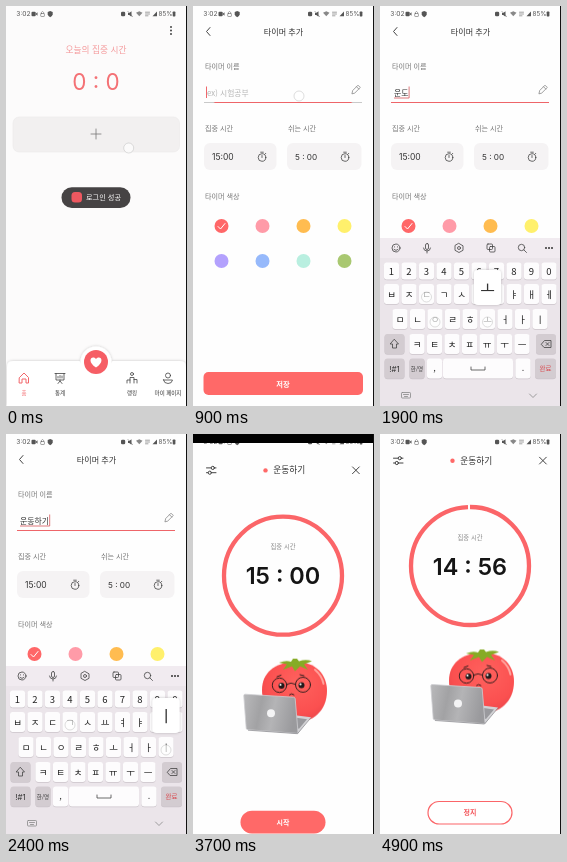
An HTML page that plays this animation: 181x400 px, repeating every 5 s.

```html
<!DOCTYPE html>
<html lang="ko">
<head>
<meta charset="utf-8">
<title>타이머</title>
<style>
html, body { margin: 0; width: 100%; height: 100%; overflow: hidden; background: #fff; }
svg { display: block; }
text { font-family: "Noto Sans CJK KR", "Noto Sans CJK", sans-serif; fill: #333; }
.num { font-family: Inter, sans-serif; }
.mid { text-anchor: middle; }
.label { font-size: 7.1px; fill: #777; }
.line { fill: none; stroke: #444; stroke-width: 1; stroke-linecap: round; stroke-linejoin: round; }
.thin { stroke-width: .8; }
.red { fill: #ff6968; }
.touch { fill: #fff; fill-opacity: .65; stroke: #bbb; stroke-opacity: .7; stroke-width: .7; }
.key { fill: #fdfcfd; }
.fn { fill: #d3ccd1; }
.cap { font-size: 9.5px; fill: #222; text-anchor: middle; }
.en text { font-family: Roboto, sans-serif; font-size: 10.5px; }
#clock text { fill: #151515; }
#status text { fill: #555; }

#add { animation: add 5s linear infinite; }
@keyframes add { 0%, 11.99% { opacity: 0 } 12% { opacity: .25 } 15%, 100% { opacity: 1 } }
#focus { transform-origin: 90px 96px; animation: focus 5s linear infinite; }
@keyframes focus { 0%, 16% { transform: scaleX(0) } 18%, 19.9% { transform: scaleX(.87) } 21%, 100% { transform: none } }
#keyboard { animation: keyboard 5s ease-out infinite; }
@keyframes keyboard {
  0%, 19.99% { transform: translateY(170px) }
  20% { transform: translateY(100px) }
  22%, 49.99% { transform: none }
  50% { transform: translateY(30px) }
  54%, 100% { transform: translateY(170px) }
}
#timer { animation: timer 5s linear infinite; }
@keyframes timer { 0%, 57.99% { opacity: 0 } 58% { opacity: .4 } 60%, 100% { opacity: 1 } }
#shift { animation: shift 5s ease-out infinite; }
@keyframes shift { 0%, 73.99% { transform: none } 74%, 75.99% { transform: translateY(9.7px) } 80%, 100% { transform: none } }
#cover { animation: cover 5s ease-out infinite; }
@keyframes cover { 0%, 73.99% { transform: translateY(-10px) } 74%, 75.99% { transform: none } 80%, 100% { transform: translateY(-10px) } }
#ring { stroke-dasharray: 900 900; animation: ring 5s linear infinite; }
@keyframes ring { 0%, 78% { stroke-dashoffset: 0 } 98%, 100% { stroke-dashoffset: 5 } }
#tomato { animation: bob 5s ease-in-out infinite; }
@keyframes bob { 0%, 85% { transform: none } 88% { transform: translateY(1px) } 93% { transform: translateY(-.5px) } 98%, 100% { transform: translateY(.5px) } }
</style>
</head>
<body>
<svg width="181" height="400" viewBox="0 0 181 400">
  <defs>
    <g id="watch" class="line thin"><circle r="3.8"/><path d="M0-2V0M-1.3-5.3H1.3M3-3.4l.8-.8"/></g>
    <radialGradient id="skin" cx=".55" cy=".35" r=".75">
      <stop offset="0" stop-color="#ff625e"/><stop offset=".65" stop-color="#fb5050"/><stop offset="1" stop-color="#e34248"/>
    </radialGradient>
    <linearGradient id="metal" x2="1" y2=".15">
      <stop stop-color="#b9b9bb"/><stop offset=".35" stop-color="#a2a2a4"/><stop offset=".6" stop-color="#b4b4b6"/><stop offset="1" stop-color="#9a9a9d"/>
    </linearGradient>
    <filter id="soft" x="-20%" y="-30%" width="140%" height="160%"><feDropShadow dx="0" dy="0" stdDeviation="1.5" flood-opacity=".22"/></filter>
  </defs>

  <g id="home">
    <rect width="181" height="400" fill="#fcfbfb"/>
    <g fill="#444"><circle cx="165" cy="21" r="1"/><circle cx="165" cy="24.5" r="1"/><circle cx="165" cy="28" r="1"/></g>
    <text class="mid" x="90" y="46.5" font-size="8.7" style="fill:#f49a9c">오늘의 집중 시간</text>
    <text class="mid num" x="90" y="84.3" font-size="22.5" style="fill:#f47175">0 : 0</text>
    <rect x="7" y="111" width="166.5" height="35" rx="6" fill="#f2f0f0" stroke="#ebe9e9" stroke-width=".6"/>
    <path class="line thin" d="M85 128H95M90 123V133" style="stroke:#777"/>
    <circle class="touch" cx="122.7" cy="142" r="5"/>
    <rect x="55.5" y="181.3" width="69" height="20.7" rx="10.3" fill="#464344"/>
    <rect x="65.5" y="186" width="10.5" height="10.5" rx="3.5" fill="#ee5860"/>
    <text x="80" y="194.3" font-size="7.2" style="fill:#fff">로그인 성공</text>
    <g filter="url(#soft)">
      <path d="M1 400V361Q1 355 7 355H73C76 355 75 369 90 369S104 355 107 355H174Q180 355 180 361V400Z" fill="#fff"/>
      <circle cx="90" cy="356" r="15.5" fill="#fff"/>
    </g>
    <circle cx="90" cy="356" r="12" fill="#f65e65"/>
    <path d="M90 361.5C80 355 86 348.5 90 353C94 348.5 100 355 90 361.5Z" fill="#fff"/>
    <path class="line" d="M13.5 371.5L18 367L22.5 371.5V377H20V373H16V377H13.5Z" style="stroke:#f2666b"/>
    <g class="line thin">
      <path d="M49 367.5H59M50 367.5V374H58V367.5M54 374V375M52 377.5L54 375L56 377.5M52 372V370.5M54 372V369.5M56 372V370"/>
      <circle cx="126" cy="368" r="1.5"/><path d="M124 377V371.5H128V377M121 377V374H124M128 373.5H131V377"/>
      <circle cx="162" cy="369.5" r="2.5"/><path d="M157.5 374H166.5Q166 377.5 162 377.5T157.5 374Z"/>
    </g>
    <g class="mid" font-size="5.5" font-weight="500">
      <text x="18" y="389" style="fill:#f2666b">홈</text><text x="54" y="389">통계</text>
      <text x="126" y="389">랭킹</text><text x="162" y="389">마이 페이지</text>
    </g>
  </g>

  <g id="add">
    <rect width="181" height="400" fill="#fefefe"/>
    <path class="line" d="M17 21.5L13.5 25.5L17 29.5"/>
    <text class="mid" x="90.5" y="28.5" font-size="8.1" font-weight="500">타이머 추가</text>
    <text class="label" x="12" y="62.8">타이머 이름</text>
    <path d="M11 96.5H169" stroke="#bbb" stroke-width=".8"/>
    <path id="focus" d="M11 96.5H169" stroke="#ee6569" stroke-width="1.2"/>
    <path class="line thin" d="M159 87.5L159.7 84.5L165 79.2L167.3 81.5L162 86.8ZM163.5 80.7L165.8 83" style="stroke:#888"/>
    <text x="14" y="89.5" font-size="7.8" style="fill:#b5b5b5" data-on="600 1400">ex) 시험공부</text>
    <path d="M13.5 80.5V92" stroke="#f0686c" data-on="900 1400"/>
    <g id="typing"></g>
    <text class="label" x="12" y="124.8">집중 시간</text>
    <text class="label" x="95" y="124.8">쉬는 시간</text>
    <rect x="11" y="137" width="72.5" height="27" rx="6" fill="#f5f3f4"/>
    <rect x="94" y="137" width="74.5" height="27" rx="6" fill="#f5f3f4"/>
    <text class="num" x="19" y="154" font-size="8.5">15:00</text>
    <text class="num" x="102" y="154" font-size="8.2">5 : 00</text>
    <use href="#watch" x="69" y="151.5"/><use href="#watch" x="152" y="151.5"/>
    <text class="label" x="12" y="192.8">타이머 색상</text>
    <g id="swatches"></g>
    <path class="line" d="M25 220.5L27.5 223L32 217.5" style="stroke:#fff"/>
    <rect class="red" x="10.5" y="366" width="159.5" height="23" rx="5"/>
    <text class="mid" x="90" y="380.5" font-size="7.3" font-weight="700" style="fill:#fff">저장</text>
    <circle class="touch" cx="106" cy="90" r="5" data-on="800 1000"/>
    <circle class="touch" cx="134.5" cy="373" r="5" style="fill-opacity:.25" data-on="2700 3000"/>
    <g id="keyboard">
      <rect y="232" width="181" height="168" fill="#ebe5ea"/>
      <rect y="232" width="181" height="20" fill="#f1ebf0"/>
      <g class="line thin">
        <circle cx="16" cy="242" r="4"/><path d="M14 243.5Q16 245.5 18 243.5M14.5 240.8V241M17.5 240.8V241"/>
        <rect x="45.5" y="237.5" width="3" height="6" rx="1.5"/><path d="M43.5 242Q43.8 245 47 245T50.5 242M47 245V247"/>
        <circle cx="79" cy="242" r="1.5"/><path d="M79 237.5L83 239.8V244.3L79 246.5L75 244.3V239.8Z"/>
        <rect x="107" y="238" width="5.5" height="5.5" rx="1"/><rect x="109.5" y="240.5" width="5.5" height="5.5" rx="1"/>
        <circle cx="141.5" cy="241.5" r="3.2"/><path d="M144 244L146.5 246.5"/>
      </g>
      <g fill="#333"><circle cx="166" cy="242" r="1"/><circle cx="169" cy="242" r="1"/><circle cx="172" cy="242" r="1"/></g>
      <g id="keys"></g>
      <g class="en" id="en" data-on="1000 1300"></g>
      <g id="ko" data-on="1300 2800"></g>
      <path class="line thin" d="M14.5 333.5L18.5 338H16.5V342H12.5V338H10.5Z"/>
      <path class="line thin" d="M161.5 338L164.5 334.5H171V341.5H164.5ZM166 336.5L169 339.5M169 336.5L166 339.5"/>
      <path class="line thin" d="M91 361V364H105V361"/>
      <g class="mid">
        <text class="num" x="14.5" y="366" font-size="7.8">!#1</text>
        <text x="37" y="365" font-size="5.5">한/영</text>
        <text x="54.5" y="365" font-size="9">,</text><text x="143" y="365" font-size="9">.</text>
        <text x="165.5" y="365" font-size="6.5" style="fill:#d9484d">완료</text>
      </g>
      <g class="line thin" style="stroke:#888"><rect x="21.5" y="386.5" width="9" height="5.5" rx=".8"/><path d="M23.5 388.5H28.5M24.5 390.5H27.5"/><path d="M149.5 388L153 391.5L156.5 388"/></g>
      <g id="taps"></g>
    </g>
  </g>

  <g id="timer"><g id="shift">
    <rect width="181" height="410" fill="#fefefe"/>
    <g class="line"><path d="M13.5 24.2H18M21.5 24.2H23M13.5 29H15M18.5 29H23"/><circle cx="19.8" cy="24.2" r="1.6"/><circle cx="16.8" cy="29" r="1.6"/>
      <path d="M159.5 23.2L166.3 30M166.3 23.2L159.5 30"/></g>
    <circle class="red" cx="72.5" cy="26.7" r="2.2"/>
    <text x="80.3" y="29.8" font-size="8.7">운동하기</text>
    <circle id="ring" cx="90" cy="132" r="59" pathLength="900" fill="none" stroke="#fb6568" stroke-width="4.3" transform="rotate(-90 90 132)"/>
    <text class="mid" x="90" y="105.5" font-size="6.3" style="fill:#888">집중 시간</text>
    <g class="mid" id="clock" font-size="23.5" font-weight="600"></g>
    <g id="tomato">
      <path d="M69 246C69 229 82 219 101 218C122 217.500 134 230 134 247C134 267 120 279 101 279S69 265 69 246Z" fill="url(#skin)"/>
      <path d="M122 226Q129 232 130.5 240" fill="none" stroke="#ffa29c" stroke-width="2" stroke-linecap="round"/>
      <path d="M86 219Q93 216 98 218L100 215H104L106 217.5Q113 215 119 217.5L111 220.5L115 226L107 222.5L102 227.5L99 222.5L90 226L94 220.5Z" fill="#86ab25"/>
      <g fill="#221b1c"><circle cx="88.5" cy="242" r="3"/><circle cx="108.5" cy="241.5" r="3"/></g>
      <g fill="#fff"><circle cx="87.5" cy="241" r="1.1"/><circle cx="107.5" cy="240.5" r="1.1"/></g>
      <g class="line" style="stroke:#37201f"><circle cx="86.5" cy="241.5" r="7.2"/><circle cx="110" cy="241" r="7.5"/>
        <path d="M93.7 240.5Q98 238 102.5 240.5M84 233L88 231.5M107 231L111 232M96.5 251Q98.5 249 101 251"/></g>
    </g>
    <path d="M98 271L118 273.5L105 290L56 286Z" fill="#d2d2d5"/>
    <path d="M100 273.5L114 275.5L106 285L102 284Z" fill="#99999d"/>
    <path d="M52 250.5L100.500 253.5Q102 253.700 102.200 255L105 288.500Q105 289.700 104 289.700L55 286Q53.300 285.700 53.200 284.500L50.800 252Q50.800 250.500 52 250.500Z" fill="url(#metal)" stroke="#cfcfd2" stroke-width=".8"/>
    <path d="M55 286.5L104.5 290L118 274" fill="none" stroke="#8b8b90" stroke-width=".7"/>
    <circle cx="78" cy="269.5" r="4" fill="#f4f4f5"/>
    <g data-on="2900 3900"><rect class="red" x="47.5" y="367" width="85" height="23" rx="11.5"/><text class="mid" x="90" y="381" font-size="7" font-weight="700" style="fill:#fff">시작</text></g>
    <g data-on="3900 5000"><rect x="48" y="367.5" width="84" height="22.5" rx="11.2" fill="#fff" stroke="#fb6568" stroke-width="1.2"/><text class="mid" x="90" y="381.3" font-size="7" font-weight="700" style="fill:#f4585d">정지</text></g>
  </g></g>

  <g id="status">
    <text class="num" x="10.3" y="10.3" font-size="6.7">3:02</text>
    <g fill="#555"><rect x="25.5" y="5.8" width="4.2" height="4.5" rx="1"/><path d="M29.500 8L31.5 6.3V9.7Z"/><path d="M41.7 6L44.2 5L46.7 6V8.5Q46.3 10.3 44.2 11.2Q42.1 10.3 41.7 8.5Z"/>
      <rect x="115" y="5.8" width="4.2" height="4.5" rx="1.3"/><path d="M122 7H123.2L125.5 5.3V10.7L123.2 9H122Z"/><path d="M130 6.7L133.3 5.3L136.500 6.7L133.3 10.3Z" opacity=".7"/><path d="M146.5 10.3L151 5.5V10.3Z"/><rect x="166.7" y="5.5" width="2.7" height="5" rx=".7"/></g>
    <g class="line" style="stroke:#666;stroke-width:.6"><rect x="34.7" y="7.5" width="3.7" height="3" rx=".6"/><path d="M35.3 7.5V6.5Q36.5 4.5 37.7 6.5V7.5M122 5.500L126.5 10.5M139.5 6.2H143.5M139.5 8H143.5M139.5 9.8H142"/></g>
    <text class="num" x="152.5" y="10.3" font-size="6.3">85%</text>
  </g>
  <rect id="cover" width="181" height="9"/>
  <rect x="180" width="1" height="400" fill="#111"/>
</svg>
<script>
const LOOP = 5000;
const get = id => document.getElementById(id);
const sheet = document.styleSheets[0];
const spans = new Set();

function make(parent, tag, attrs, text = '') {
  const el = document.createElementNS('http://www.w3.org/2000/svg', tag);
  for (const name in attrs) el.setAttribute(name, attrs[name]);
  el.textContent = text;
  parent.append(el);
  return el;
}

// Makes an element visible between two times of every loop.
function show(el, from, to) {
  const part = (to - from) / LOOP * 100;
  const name = 'on' + (to - from);
  if (!spans.has(name)) {
    spans.add(name);
    sheet.insertRule(`@keyframes ${name} { 0% { visibility: visible } ${part}%, 100% { visibility: hidden } }`, sheet.cssRules.length);
  }
  el.style.visibility = 'hidden';
  el.style.animation = `${name} ${LOOP}ms step-end ${from}ms infinite`;
}

['#ff6768', '#ff9ba8', '#ffbc50', '#fff06c', '#b3a1fd', '#96b9fb', '#b9efe0', '#a9c871'].forEach((fill, i) =>
  make(get('swatches'), 'circle', { cx: 28.5 + i % 4 * 41, cy: i < 4 ? 220 : 255, r: 7, fill }));

// Keyboard
const key = (x, y, w, h = 20, cls = 'key') => {
  make(get('keys'), 'rect', { x: x - w / 2, y: y - h / 2 + .7, width: w, height: h, rx: 3, fill: '#cbc4ca' });
  make(get('keys'), 'rect', { x: x - w / 2, y: y - h / 2, width: w, height: h, rx: 3, class: cls });
};
const rows = [
  { x: 11.5, y: 265, h: 17, en: '1234567890', ko: '1234567890' },
  { x: 11.5, y: 288, en: 'qwertyuiop', ko: 'ㅂㅈㄷㄱㅅㅛㅕㅑㅐㅔ' },
  { x: 20, y: 313, en: 'asdfghjkl', ko: 'ㅁㄴㅇㄹㅎㅗㅓㅏㅣ' },
  { x: 37, y: 338, en: 'zxcvbnm', ko: 'ㅋㅌㅊㅍㅠㅜㅡ' }
];
const spot = {};
for (const row of rows) {
  [...row.en].forEach((letter, i) => {
    const x = row.x + i * 17.5, y = row.y;
    key(x, y, 15.2, row.h);
    make(get('en'), 'text', { x, y: y + 3.5, class: 'cap' }, letter);
    make(get('ko'), 'text', { x, y: y + 3.5, class: 'cap' }, row.ko[i]);
    spot[row.ko[i]] = { x, y };
  });
}
key(14.5, 338, 20, 20, 'fn');
key(166, 338, 20, 20, 'fn');
key(14.5, 362.5, 20, 20, 'fn');
key(37, 362.5, 15.2, 20, 'fn');
key(54.5, 362.5, 15.2);
key(98, 362.5, 70);
key(143, 362.5, 15.2);
key(165.5, 362.5, 21, 20, 'fn');

// Typing: time, pressed key, resulting text
const strokes = [
  [1400, 'ㅇ', 'ㅇ'], [1500, 'ㅜ', '우'], [1600, 'ㄴ', '운'], [1800, 'ㄷ', '운ㄷ'], [1900, 'ㅗ', '운도'],
  [2000, 'ㅇ', '운동'], [2100, 'ㅎ', '운동ㅎ'], [2200, 'ㅏ', '운동하'], [2300, 'ㄱ', '운동학'], [2400, 'ㅣ', '운동하기']
];
strokes.forEach(([at, letter, word], i) => {
  const next = i + 1 < strokes.length ? strokes[i + 1][0] : LOOP;
  const end = 14.5 + word.length * 7.3;
  show(make(get('typing'), 'text', { x: 14, y: 89.5, 'font-size': 7.9, 'font-weight': 500 }, word), at, next);
  const caret = make(get('typing'), 'path', { d: `M${end} 80.5V92M14 92H${end}`, stroke: '#d9575c', 'stroke-width': .8 });
  show(caret, at, Math.min(next, 2500));

  const { x, y } = spot[letter];
  show(make(get('taps'), 'circle', { cx: x, cy: y + 3, r: 5, class: 'touch' }), at - 100, Math.min(at + 200, 2500));
  const popup = make(get('taps'), 'g', {});
  make(popup, 'rect', { x: x - 13.5, y: y - 49, width: 27, height: 35, rx: 4, fill: '#fff', filter: 'url(#soft)' });
  make(popup, 'text', { x, y: y - 25, class: 'mid', 'font-size': 16 }, letter);
  show(popup, at, at + 100);
});

// Countdown
const ticks = [2900, 4000, 4300, 4600, 4900, LOOP];
['15 : 00', '14 : 59', '14 : 58', '14 : 57', '14 : 56'].forEach((time, i) =>
  show(make(get('clock'), 'text', { x: 90, y: 140.8, class: 'num' }, time), ticks[i], ticks[i + 1]));

document.querySelectorAll('[data-on]').forEach(el => show(el, ...el.dataset.on.split(' ').map(Number)));
</script>
</body>
</html>
```
